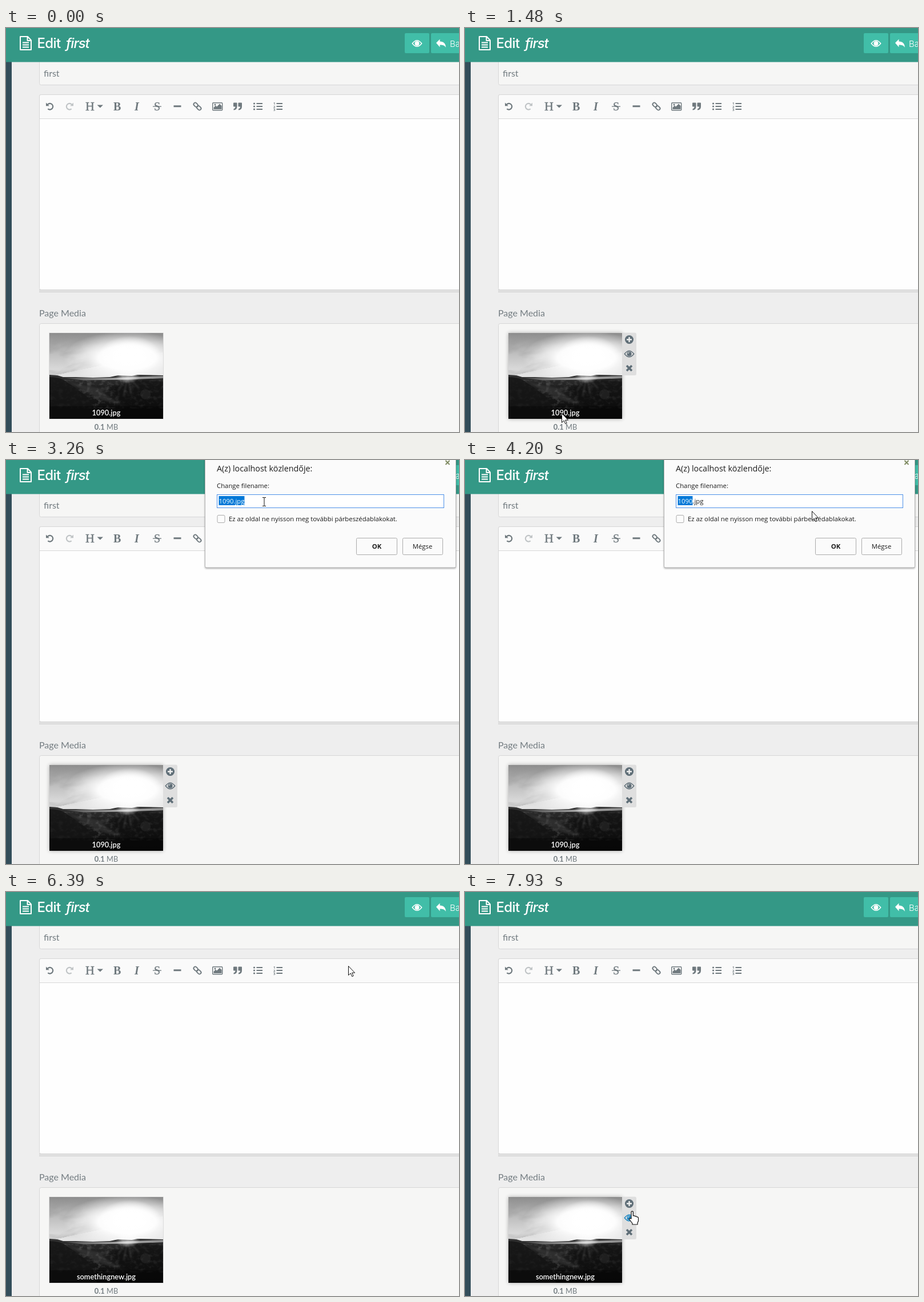
An HTML page that plays this animation: 793x706 px, repeating every 8 s.

```html
<!DOCTYPE html>
<html lang="en">
<head>
<meta charset="utf-8">
<title>Rename page media</title>
<style>
  html, body { margin: 0; width: 100%; height: 100%; overflow: hidden; background: #eee; }
  svg { display: block; width: 793px; height: 706px; }
  .page { font-family: Lato, sans-serif; font-size: 16px; fill: #737c81; }
  .head { font-family: Inter, sans-serif; fill: #fff; }
  .dlg { font-family: "Open Sans", "Noto Sans", sans-serif; font-size: 11.33px; fill: #1c1c1c; }
  .serif { font-family: "Liberation Serif", serif; font-size: 20px; fill: #6f797e; }
  .digits { font-family: "Open Sans", sans-serif; font-size: 6px; font-weight: 700; fill: #6f797e; }
  .small { font-size: 12.8px; }
  .title { font-size: 14.3px; }
  .line { fill: none; stroke: currentColor; }
  .solid { fill: currentColor; }
  text { white-space: pre; }
</style>
</head>
<body>
<svg viewBox="0 0 793 706">
  <defs>
    <linearGradient id="sky" x2="0" y2="1">
      <stop offset="0" stop-color="#8c8c8c"/>
      <stop offset=".22" stop-color="#bcbcbc"/>
      <stop offset=".48" stop-color="#e2e2e2"/>
    </linearGradient>
    <linearGradient id="land" x2="0" y2="1">
      <stop offset="0" stop-color="#333"/>
      <stop offset=".3" stop-color="#1e1e1e"/>
      <stop offset="1" stop-color="#070707"/>
    </linearGradient>
    <linearGradient id="field-light">
      <stop offset="0" stop-color="#555"/>
      <stop offset=".6" stop-color="#ddd"/>
      <stop offset="1" stop-color="#aaa"/>
    </linearGradient>
    <radialGradient id="sun">
      <stop offset="0" stop-color="#fff"/>
      <stop offset=".45" stop-color="#fff" stop-opacity=".95"/>
      <stop offset="1" stop-color="#fff" stop-opacity="0"/>
    </radialGradient>
    <filter id="cloud" x="0" y="0" width="1" height="1">
      <feTurbulence type="fractalNoise" baseFrequency=".018 .05" numOctaves="4" seed="5"/>
      <feColorMatrix values="0 0 0 0 .3  0 0 0 0 .3  0 0 0 0 .3  3 0 0 0 -1.2"/>
    </filter>
    <filter id="grass" x="0" y="0" width="1" height="1">
      <feTurbulence type="fractalNoise" baseFrequency=".12 .16" numOctaves="3" seed="8"/>
      <feColorMatrix values="0 0 0 0 .5  0 0 0 0 .5  0 0 0 0 .5  3 0 0 0 -1.4"/>
    </filter>
    <filter id="haze" x="-40%" y="-40%" width="180%" height="180%"><feGaussianBlur stdDeviation="1.8"/></filter>
    <filter id="glow" x="-20%" y="-20%" width="140%" height="140%"><feGaussianBlur stdDeviation="3.5"/></filter>
    <clipPath id="photoClip"><path d="M76 533h199v150H76z"/></clipPath>
    <g id="eye">
      <path class="line" stroke-width="1.5" d="M-8.2 0Q0-10.6 8.2 0Q0 10.6-8.2 0Z"/>
      <circle class="solid" r="4"/>
      <path d="M-2.2-.2A2.2 2.2 0 0 1 0-2.4" fill="none" stroke="#eee"/>
    </g>
    <g id="turn">
      <path class="line" stroke-width="2.2" d="M-4.2-3.2A5.3 5.3 0 1 1-3.7 4.2"/>
      <path class="solid" d="M-7-6.5V-.7H-1.2Z"/>
    </g>
  </defs>

  <path fill="#eee" d="M0 0h793v706H0z"/>
  <path fill="#334e5a" d="M0 59h10v647H0z"/>

  <g stroke="#d7d7d7">
    <rect x="58.5" y="40.5" width="760" height="59" rx="3" fill="#f6f6f5"/>
    <rect x="58.5" y="116.5" width="760" height="341" rx="3" fill="#fefefe"/>
    <path fill="#fafafa" d="M58.5 158.5V119q0-2.5 2.5-2.5H800v42z"/>
    <path fill="none" stroke="#cfcfcf" d="M58 457.5h740M58 459.5h740M58 461.5h740"/>
    <rect x="58.5" y="516.5" width="760" height="230" rx="3" fill="#f6f6f5"/>
  </g>
  <g class="page">
    <text x="66" y="85">first</text>
    <text x="58" y="503.5">Page Media</text>
    <text class="small" x="175.5" y="702" text-anchor="middle"><tspan font-weight="700">0.1</tspan> MB</text>
  </g>

  <path fill="#349886" d="M0 0h793v59.5H0z"/>
  <g class="head">
    <path fill="none" stroke="#fff" stroke-width="2" stroke-linejoin="round" d="M25 15h13l6 6.5V38H25zM37.5 15v7H44M29 25.5h11M29 29.5h11M29 33.5h11"/>
    <text x="54.5" y="35" font-size="24" font-weight="500" letter-spacing="-.6">Edit</text>
    <text x="105" y="35" font-size="24" font-weight="500" letter-spacing="-1" font-style="italic">first</text>
    <rect x="698" y="9" width="43" height="35" rx="2" fill="#41bea8"/>
    <rect x="744" y="9" width="60" height="35" rx="2" fill="#41bea8"/>
    <use href="#eye" x="719.5" y="27" color="#fff"/>
    <path d="M753 26l6.5-6.5v4q10 0 10.5 10.5q-3-5-10.5-4.5v4z"/>
    <text x="777" y="33" font-size="15" font-weight="300">Ba</text>
  </g>

  <g color="#6f797e">
    <use href="#turn" x="77" y="137"/>
    <use href="#turn" transform="translate(111 137) scale(-1 1)" color="#c0c4c6"/>
    <g class="serif">
      <text x="139" y="144" font-size="22" stroke="#6f797e" stroke-width=".4">H</text>
      <text x="188" y="144" font-weight="700">B</text>
      <text x="225" y="144" font-weight="700" font-style="italic">I</text>
      <text x="259" y="144" stroke="#6f797e" stroke-width=".3">S</text>
    </g>
    <path class="solid" d="M159.500 134.500h10.500l-5.200 5zM257 136.500h15v1.300h-15zM293.500 135.200h13v3h-13z"/>
    <g class="line" stroke-width="1.9" transform="translate(335 137) rotate(45)">
      <rect x="-8" y="-2.8" width="8.5" height="5.6" rx="2.8"/>
      <rect x="-.5" y="-2.8" width="8.5" height="5.6" rx="2.8"/>
    </g>
    <rect class="line" x="361.7" y="130.7" width="17" height="13" rx="1" stroke-width="1.4"/>
    <path class="solid" d="M363.500 142v-3l3.500-3.500 2 2 5-5 3.500 3.500v6z"/>
    <circle class="solid" cx="366" cy="134" r="1.5"/>
    <path id="quote" class="solid" d="M398 131.500q0-1 1-1h4.500q1 0 1 1v5.500q0 6-6 6.500v-2.300q3-.5 3-3.700h-2.500q-1 0-1-1z"/>
    <use href="#quote" x="8.5"/>
    <path class="line" stroke-width="2.2" d="M438.500 132h10.500m-10.500 5h10.500m-10.500 5h10.500M473.500 132h10.500m-10.500 5h10.500m-10.500 5h10.500"/>
    <path class="line" stroke-width="3.2" stroke-linecap="round" d="M434.500 132h.01M434.500 137h.01M434.500 142h.01"/>
    <g class="digits">
      <text x="468" y="134">1</text><text x="468" y="139.5">2</text><text x="468" y="145">3</text>
    </g>
  </g>

  <rect id="shadow" x="76" y="533" width="199" height="150" fill="#000" opacity=".3" filter="url(#glow)"/>
  <path id="frame" fill="#dcdcdc" d="M75 532.500h201v151H75z"/>
  <g clip-path="url(#photoClip)">
    <path fill="url(#sky)" d="M76 533h199v151H76z"/>
    <g transform="rotate(-12 175 570)" opacity=".45">
      <rect x="60" y="515" width="235" height="72" filter="url(#cloud)"/>
    </g>
    <ellipse cx="212" cy="576" rx="112" ry="46" fill="url(#sun)"/>
    <ellipse cx="217" cy="572" rx="54" ry="34" fill="url(#sun)"/>
    <path fill="url(#land)" d="M76 606l14 1 10 3 22 0 30 1 30-1 14-3 24 1 10-2 45 1v77H76z"/>
    <path fill="url(#field-light)" opacity=".75" d="M102 611.500l80 0 93-3.500v4l-60 2.500-80 1z"/>
    <rect x="76" y="615" width="199" height="50" filter="url(#grass)" opacity=".22"/>
    <path fill="#141414" opacity=".8" d="M76 610q22 0 32 10q20 12 42 32l10 32H76z"/>
    <path fill="#484848" opacity=".4" filter="url(#haze)" d="M112 620q30 6 54 10l20-3-18 8q20 18 48 26-50-8-72-23z"/>
    <path fill="#0d0d0d" opacity=".6" filter="url(#haze)" d="M180 630q45-22 95-13v67h-78q10-30-17-54z"/>
    <path stroke="#fff" stroke-width="2" opacity=".14" filter="url(#haze)" d="M213 608l-17 26M213 608l-7 36M213 608l6 32M213 608l20 22"/>
    <ellipse cx="213" cy="607" rx="22" ry="14" fill="url(#sun)" opacity=".5"/>
    <circle cx="244" cy="640" r="9" fill="#fff" opacity=".06"/>
    <path fill="#000" opacity=".35" d="M76 661h199v23H76z"/>
  </g>
  <text id="fileName" class="page small" x="175.5" y="677" text-anchor="middle" font-weight="600" style="fill:#fff"></text>

  <g id="tools" color="#5f6e77">
    <path fill="#dfdfdf" d="M275 532.500h22q3 0 3 3v68.500q0 3-3 3h-22z"/>
    <circle class="solid" cx="287.5" cy="544.5" r="7.5"/>
    <path stroke="#eee" stroke-width="2.4" d="M283 544.500h9M287.500 540v9"/>
    <use id="toolEye" href="#eye" x="287.5" y="569.5"/>
    <path class="line" stroke-width="3.6" d="M283 590l9 9M292 590l-9 9"/>
  </g>

  <g id="dialog" class="dlg">
    <rect x="348" y="-8" width="440" height="198" rx="3" fill="#000" opacity=".3" filter="url(#haze)"/>
    <rect x="348.5" y="-9" width="439" height="197" rx="2.5" fill="#fbfbfb" stroke="#b4b4b4"/>
    <path stroke="#7f8b62" stroke-width="2" d="M769.500 1l7 7M776.500 1l-7 7"/>
    <text class="title" x="369" y="20">A(z) localhost közlendője:</text>
    <text x="369" y="49">Change filename:</text>
    <rect x="369.5" y="60.5" width="397" height="23" fill="#fff" stroke="#4d90e8"/>
    <rect id="selection" y="63" height="16" fill="#0078d7"/>
    <text id="field" x="372.5" y="76"><tspan></tspan><tspan fill="#fff"></tspan><tspan></tspan></text>
    <path id="caret" stroke="#000" d="M0 63v16"/>
    <rect x="370" y="96.5" width="13" height="13" rx="2" fill="#fcfcfc" stroke="#ababab"/>
    <text x="390" y="107">Ez az oldal ne nyisson meg további párbeszédablakokat.</text>
    <g fill="#fbfbfb" stroke="#ababab">
      <rect x="613.5" y="136.5" width="71" height="29" rx="2"/>
      <rect x="694.5" y="136.5" width="70" height="29" rx="2"/>
    </g>
    <g text-anchor="middle">
      <text x="649" y="154.5" font-weight="700">OK</text>
      <text x="729" y="154.5">Mégse</text>
    </g>
  </g>

  <g id="pointer" stroke-linejoin="round">
    <path id="arrow" fill="#fff" stroke="#111" d="M.5.5V16.500l3.700-3.500 2.600 5.700 2.400-1.100-2.600-5.400h5z"/>
    <path id="beam" fill="none" stroke="#111" d="M-3-7.500H-.8L0-7 .8-7.500H3M0-7V7M-3 7.500H-.8L0 7 .8 7.500H3"/>
    <path id="hand" fill="#fff" stroke="#111" stroke-width="1.2" d="M-2 13V1.500a1.700 1.700 0 0 1 3.400 0V8q3-1 3.300 1q3-1 3.200 1q2.600-.5 2.600 2v5l-1.500 3v3h-9v-2l-5-6.500q-.8-2.500 1.400-2z"/>
  </g>
</svg>
<script>
const LOOP = 8000, OPEN = 1490, CLOSE = 5690, RENAMED = 5840;
const WORD = 'somethingnew', OLD = '1090.jpg', FIELD_X = 372.5;
const $ = id => document.getElementById(id);
const show = (id, on) => $(id).setAttribute('display', on ? 'inline' : 'none');

// Pointer strokes: start, end, number of steps, points along the way.
const moves = [
  [70, 300, 4, [[564, 543], [495, 570], [435, 597]]],
  [470, 1250, 11, [[433, 602], [310, 655], [215, 687], [170, 675]]],
  [1340, 1640, 5, [[169, 673], [168, 673]]],
  [2340, 3100, 11, [[214, 632], [430, 400], [640, 180], [655, 85], [560, 66], [490, 72]]],
  [3170, 3820, 9, [[480, 72], [424, 73], [399, 72], [390, 72], [376, 72]]],
  [3960, 4200, 4, [[400, 72], [470, 74], [560, 82], [607, 89]]],
  [6390, 7160, 11, [[599, 129], [661, 220], [560, 390], [380, 560], [230, 655], [180, 676]]],
  [7240, 7930, 10, [[182, 675], [220, 645], [265, 595], [293, 558]]]
];

function stepOf(t, [start, end, steps]) {
  return Math.min(steps - 1, Math.floor((t - start) / (end - start) * (steps - 1) + 1e-6));
}

function pointerAt(t) {
  const move = moves.filter(m => t >= m[0]).pop();
  if (!move) return null;
  const [, , steps, pts] = move;
  const u = stepOf(t, move) / (steps - 1) * (pts.length - 1);
  const i = Math.min(pts.length - 2, Math.floor(u)), f = u - i;
  return pts[i].map((v, axis) => v + (pts[i + 1][axis] - v) * f);
}

// Text of the field with its selected range; an empty range is a caret.
function fieldAt(t) {
  if (t < 3170) return [OLD, 0, OLD.length];
  if (t < 4590) {
    const k = stepOf(t, [3170, 3820, 9]);
    return k < 3 ? [OLD, 0, OLD.length] : [OLD, Math.min(4, 8 - k), 4];
  }
  const k = t < 4740 ? -1 : stepOf(t, [4740, 5460, 10]);
  const length = k + 2 + (k >= 5);
  return [WORD.slice(0, length) + '.jpg', length, length];
}

function drawField(t) {
  const [text, from, to] = fieldAt(t), field = $('field');
  [text.slice(0, from), text.slice(from, to), text.slice(to)]
    .forEach((part, i) => { field.children[i].textContent = part; });
  const xAt = n => FIELD_X + (n ? field.getSubStringLength(0, n) : 0);
  $('selection').setAttribute('x', xAt(from));
  $('selection').setAttribute('width', xAt(to) - xAt(from));
  $('caret').setAttribute('transform', `translate(${Math.floor(xAt(to)) + .5})`);
  show('caret', from === to);
}

function setHover(on) {
  show('tools', on);
  show('shadow', on);
  show('frame', !on);
}

function drawPointer(pos, open) {
  show('pointer', pos);
  if (!pos) return setHover(false);
  const [x, y] = pos.map(Math.round);
  const within = (l, t, r, b) => x >= l && x < r && y >= t && y < b;
  const overTools = !open && within(276, 532, 300, 607);
  const overText = open ? within(369, 60, 767, 84)
    : within(58, 60, 793, 100) || within(58, 158, 793, 457);
  $('pointer').setAttribute('transform', `translate(${x} ${y})`);
  show('hand', overTools);
  show('beam', overText);
  show('arrow', !overTools && !overText);
  setHover(open || overTools || within(75, 532, 276, 706));
  $('toolEye').setAttribute('color', overTools && within(276, 557, 300, 582) ? '#1c86c2' : '#5f6e77');
}

function draw(t) {
  const open = t >= OPEN && t < CLOSE;
  show('dialog', open);
  if (open) {
    $('dialog').setAttribute('opacity', Math.min(1, .4 * (1 + Math.floor((t - OPEN) / 75))));
    drawField(t);
  }
  $('fileName').textContent = t < RENAMED ? OLD : WORD + '.jpg';
  drawPointer(pointerAt(t), open);
}

function frame() {
  draw(performance.now() % LOOP);
  requestAnimationFrame(frame);
}
frame();
</script>
</body>
</html>
```
